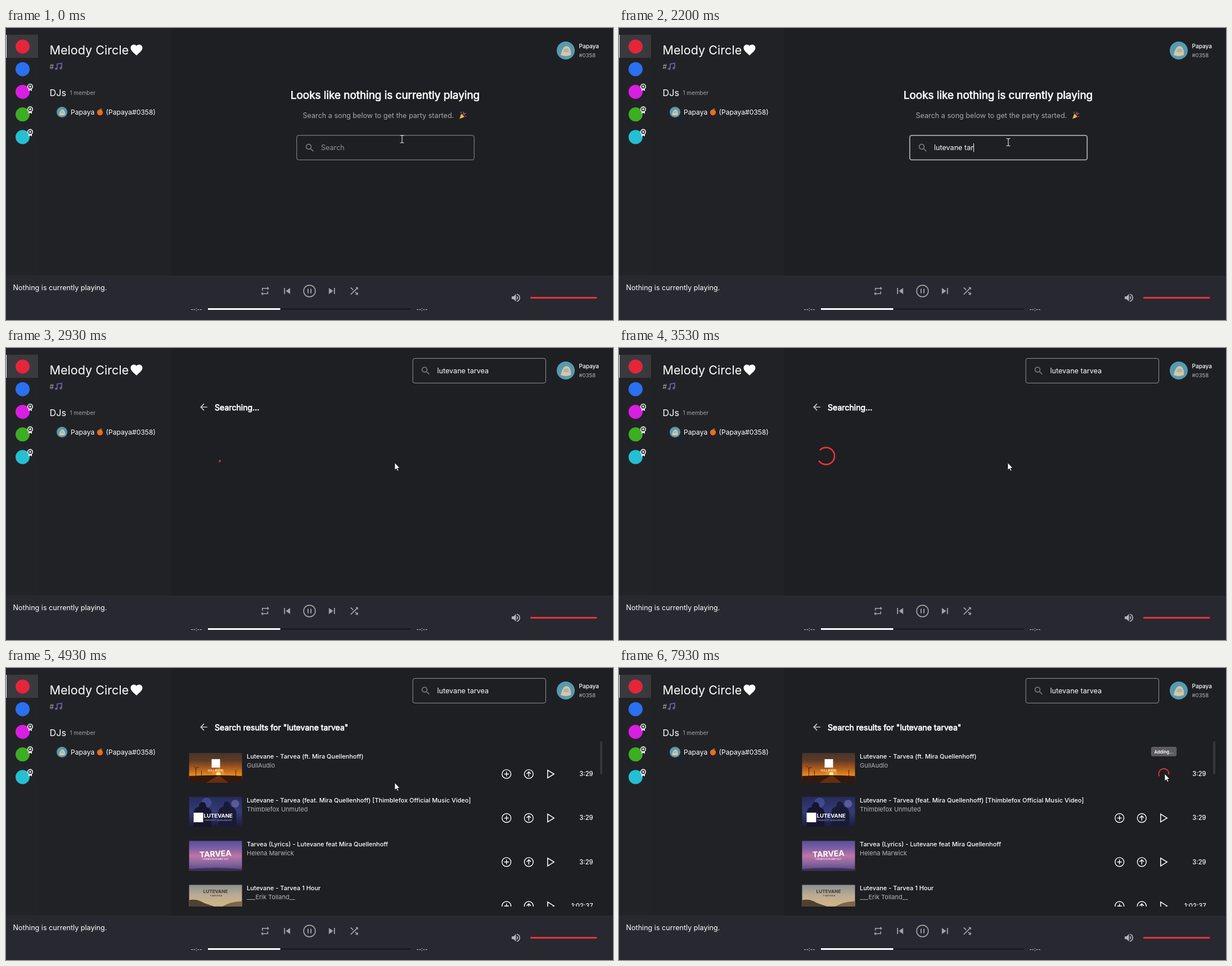
An HTML page for the animation above (8000 ms loop, 1079 px wide and 519 px high).

```html
<!DOCTYPE html>
<html lang="en">
<head>
<meta charset="utf-8">
<title>Music room</title>
<style>
  html, body { margin: 0; width: 100%; height: 100%; overflow: hidden; background: #1e1f23; }
  svg { display: block; width: 1079px; height: 519px; }
  text { font-family: Inter, "Open Sans", sans-serif; white-space: pre; }
</style>
</head>
<body>
<svg id="stage" viewBox="0 0 1079 519" xmlns="http://www.w3.org/2000/svg"></svg>
<script>
const LOOP = 8000;
const QUERY = 'lutevane tarvea';
const RED = '#e93239';
const GREY = '#a3a3a7';

const ICON = {
  search: 'M15.5 14h-.79l-.28-.27C15.41 12.59 16 11.11 16 9.5 16 5.91 13.09 3 9.5 3S3 5.91 3 9.5 5.91 16 9.5 16c1.61 0 3.09-.59 4.23-1.57l.27.28v.79l5 4.99L20.49 19l-4.99-5zm-6 0C7.01 14 5 11.99 5 9.5S7.01 5 9.5 5 14 7.01 14 9.5 11.99 14 9.5 14z',
  repeat: 'M7 7h10v3l4-4-4-4v3H5v6h2V7zm10 10H7v-3l-4 4 4 4v-3h12v-6h-2v4z',
  prev: 'M6 6h2v12H6zm3.5 6l8.5 6V6z',
  next: 'M6 18l8.5-6L6 6v12zM16 6v12h2V6h-2z',
  shuffle: 'M10.59 9.17L5.41 4 4 5.41l5.17 5.17 1.42-1.41zM14.5 4l2.04 2.04L4 18.59 5.41 20 17.96 7.46 20 9.5V4h-5.5zm.33 9.41l-1.41 1.41 3.13 3.13L14.5 20H20v-5.5l-2.04 2.04-3.13-3.13z',
  volume: 'M3 9v6h4l5 5V4L7 9H3zm13.5 3c0-1.77-1.02-3.29-2.5-4.03v8.05c1.48-.73 2.5-2.25 2.5-4.02zM14 3.23v2.06c2.89.86 5 3.54 5 6.71s-2.11 5.85-5 6.71v2.06c4.01-.91 7-4.49 7-8.77s-2.99-7.86-7-8.77z',
  back: 'M20 11H7.83l5.59-5.59L12 4l-8 8 8 8 1.41-1.41L7.83 13H20v-2z',
  heart: 'M12 21.35l-1.45-1.32C5.4 15.36 2 12.28 2 8.5 2 5.42 4.42 3 7.5 3c1.74 0 3.41.81 4.5 2.09C13.09 3.81 14.76 3 16.5 3 19.58 3 22 5.42 22 8.5c0 3.78-3.4 6.86-8.55 11.54L12 21.35z'
};

// Markup helpers
const rect = (x, y, w, h, fill, more = '') =>
  `<rect x="${x}" y="${y}" width="${w}" height="${h}" fill="${fill}" ${more}/>`;
const circle = (x, y, r, fill, more = '') =>
  `<circle cx="${x}" cy="${y}" r="${r}" fill="${fill}" ${more}/>`;
const path = (d, fill, more = '') => `<path d="${d}" fill="${fill}" ${more}/>`;
const line = (d, color, w = 1, more = '') =>
  path(d, 'none', `stroke="${color}" stroke-width="${w}" ${more}`);
const text = (x, y, size, str, fill = '#fff', more = '') =>
  `<text x="${x}" y="${y}" font-size="${size}" fill="${fill}" ${more}>${str}</text>`;
const bold = (x, y, size, str, more = '') =>
  text(x, y, size, str, '#fff', `stroke="#fff" stroke-width=".7" ${more}`);
const icon = (name, x, y, scale, fill = GREY) =>
  path(ICON[name], fill, `transform="translate(${x} ${y}) scale(${scale}) translate(-12 -12)"`);
const group = (id, body, more = '') => `<g id="${id}" ${more}>${body}</g>`;
const gradient = (id, ...colors) =>
  `<linearGradient id="${id}" x2="0" y2="1">${colors.map((c, i) =>
    `<stop offset="${i / (colors.length - 1)}" stop-color="${c}"/>`).join('')}</linearGradient>`;

const avatar = (x, y, r) => `<g transform="translate(${x} ${y}) scale(${r / 16})">` +
  circle(0, 0, 16, '#579bb0') +
  path('M-9 8Q-8 1-4 -5Q1 -10 6 -6Q10 0 9 8Q0 12-9 8z', '#d8c6a4') +
  path('M-4 3Q-4-4 1-4Q6-4 6 3z', '#a9b5ae') + '</g>';

const badge = (x, y) =>
  path(`M${x - 3} ${y + 2}v6l3-1.6 3 1.6v-6z`, '#f2f2f2') +
  circle(x, y, 4.3, '#27282c', 'stroke="#f2f2f2" stroke-width="1.6"') +
  circle(x, y, 1.8, '#f2f2f2');

function servers() {
  const colors = ['#e6253b', '#2b70ee', '#d81fdf', '#3cae22', '#25bfd4'];
  return rect(0, 0, 57, 440, '#222327') + rect(57, 0, 237, 440, '#212226') +
    rect(0, 12, 57, 41, '#3a3a3e') + rect(0, 12, 1, 41, '#fff') +
    colors.map((c, i) => circle(29.5, 33 + 40.2 * i, 12.5, c) +
      (i > 1 ? badge(43, 23.5 + 40.3 * i) : '')).join('');
}

function sidebar() {
  const note = line('M91 72V64l8-1.500V71', '#6d5aa5', 1.8) +
    circle(89.4, 72.4, 2.2, '#6d5aa5') + circle(97.4, 71.2, 2.2, '#6d5aa5');
  const fruit = circle(167, 150, 5.2, '#f4691c') + path('M166 145.500q2-3.500 5-2q-1 2.500-5 2z', '#4d9a35');
  return text(77.5, 47, 21.6, 'Melody Circle') + icon('heart', 232, 39, 1.05, '#fff') +
    text(77.5, 73, 12, '#', '#a9a9ad') + note +
    text(77.5, 121, 16.2, 'DJs') + text(113.5, 118.7, 9.9, '1 member', GREY) +
    avatar(99.5, 149.5, 9.5) + text(115, 153.5, 12.1, 'Papaya') + fruit +
    text(177.5, 153.5, 12.1, '(Papaya#0358)');
}

function account() {
  return avatar(995, 40, 16) + text(1018.5, 35.6, 10.1, 'Papaya', '#fff', 'font-weight="500"') +
    text(1018.5, 52, 9.6, '#0358', '#b5b5b8');
}

function footer() {
  return rect(0, 440, 1079, 79, '#282830') + text(12.5, 465.5, 12.6, 'Nothing is currently playing.') +
    icon('repeat', 460.5, 467.5, 0.8) + icon('prev', 499.7, 467.5, 0.9) +
    circle(539.5, 467.5, 10.4, 'none', `stroke="${GREY}" stroke-width="1.6"`) +
    rect(536, 463.5, 1.8, 8, GREY) + rect(541.2, 463.5, 1.8, 8, GREY) +
    icon('next', 579.3, 467.5, 0.9) + icon('shuffle', 619, 467.5, 0.85) +
    text(328.5, 503, 9.4, '--:--') + text(729.5, 503, 9.4, '--:--') +
    rect(359, 498, 361, 3, '#1c1c20') + rect(359, 498, 128.5, 3, '#fff') +
    icon('volume', 906.5, 479.5, 0.83, '#b5b5b8') + rect(932, 478, 118.5, 3, RED, 'rx="1"');
}

function home() {
  const popper = path('M806 161.500l3.500-9.500 5.500 6z', '#f0b93a') +
    line('M812 153q3-1 1-4M814 155q1-4 4-3', '#c65a9a', 1.2) +
    circle(809, 150, 0.9, '#5f9fe0') + circle(817, 157, 0.9, '#e4573f');
  return bold(674, 126, 18.9, 'Looks like nothing is currently playing', 'text-anchor="middle"') +
    text(527.5, 160.3, 12.6, 'Search a song below to get the party started.', '#a9a9ac') + popper +
    rect(516.8, 190.8, 315.4, 43.6, 'none', 'id="field" rx="3.500" stroke="#929294"') +
    icon('search', 540, 213, 0.8, '#77787b') +
    text(560, 217.3, 12.6, '', '#fff', 'id="typed"') + rect(560, 205, 1, 15.5, '#fff', 'id="caret"');
}

function suggestions() {
  const words = ['lute practices', 'lute verse', 'lute', 'lutenist handbook',
    'lute definition', 'lute grip lesson', 'luthier'];
  return rect(517, 237.5, 315.5, 208, '#303033', 'rx="3"') +
    rect(828, 238, 4.5, 105, '#0b0b0d') +
    words.map((w, i) => text(529, 263 + 28.45 * i, 12.6, w)).join('');
}

function pageTop() {
  return rect(723.2, 18.5, 236.300, 43.8, 'none', 'rx="3.500" stroke="#939395"') +
    icon('search', 746, 40.5, 0.8, '#77787b') + text(766.5, 45, 12.6, QUERY) +
    icon('back', 351.5, 105, 0.8, '#c4c4c6') + bold(371, 110.5, 14.1, '', 'id="heading"');
}

// Thumbnails are 94 by 53, drawn from their own corner
const label = (x, y, size, str, fill, more = '') =>
  text(x, y, size, str, fill, `text-anchor="middle" font-weight="700" ${more}`);
const thumbs = [
  rect(0, 0, 94, 53, 'url(#dusk)') + circle(52, 38, 11, '#ffa528', 'opacity=".45"') +
    circle(52, 38, 4, '#ffe9a0') + path('M0 41Q48 38 94 41V53H0z', '#32180e') +
    path('M30 53L50 41h5L70 53z', '#7a3a12', 'opacity=".7"') +
    line('M12 41V27l-4-4M12 27l5-2M12 27v6M22 41V31M83 41V30', '#2c1a12', 0.8) +
    rect(40, 11, 15, 15, '#fff') + label(47, 33, 4.6, 'GULL AUDIO', '#f5e6d8'),
  rect(0, 0, 94, 53, 'url(#club)') + circle(31, 10, 9, '#4d60b0', 'opacity=".55"') +
    circle(82, 12, 7, '#8a82c8', 'opacity=".5"') +
    path('M8 53V27q2-9 9-9q1-9 7-9t7 9q9 2 9 12v23z', '#15162e') +
    path('M52 53V25q2-7 9-8q0-9 6-9t7 9q9 2 10 12v24z', '#191a36') +
    rect(8, 28, 17, 17, '#fff') + text(26, 36.5, 9.6, 'LUTEVANE', '#fff', 'font-weight="700"') +
    text(27, 42.5, 3.8, 'TARVEA FT. QUELLENHOFF', '#b9b9d4'),
  rect(0, 0, 94, 53, 'url(#shore)') + path('M0 53V50Q47 46 94 50V53z', '#3c3159') +
    label(47, 28, 14, 'TARVEA', '#fff', 'transform="rotate(-3 47 25)"') +
    label(47, 34, 3.6, 'LOREM DOLOR AMET ELIT', '#f0dff0'),
  rect(0, 0, 94, 53, 'url(#sand)') + path('M0 27Q14 24 26 32L46 39H0z', '#51412f') +
    path('M94 29Q72 30 58 39H94z', '#7d6547') +
    label(47, 15, 8.2, 'LUTEVANE', '#413a38') + label(48, 21, 4, 'T A R V E A', '#413a38')
];

function row(i, title, artist, time) {
  const y = 78.15 * i;
  const ring = x => circle(x, 188.5, 7.9, 'none', 'stroke="#fff" stroke-width="1.4"');
  const buttons = ring(889.7) + line('M885.500 188.500h8.400M889.700 184.300v8.400', '#fff', 1.4) +
    ring(929.3) + line('M929.300 193v-8M925.500 188.300l3.800-3.800 3.800 3.800', '#fff', 1.4) +
    line('M962.800 181.500v14l11.400-7z', '#fff', 1.5);
  return `<g transform="translate(0 ${y})"><g transform="translate(325.500 151)">${thumbs[i]}</g>` +
    text(428, 160.5, 11, title, '#fff', 'font-weight="500"') +
    text(428, 176.5, 11, artist, '#b6b6b9') + group('buttons' + i, buttons) +
    text(1043.5, 192.3, 11.1, time, '#fff', 'text-anchor="end" font-weight="500"') + '</g>';
}

function results() {
  return '<g clip-path="url(#rows)">' +
    row(0, 'Lutevane - Tarvea (ft. Mira Quellenhoff)', 'GullAudio', '3:29') +
    row(1, 'Lutevane - Tarvea (feat. Mira Quellenhoff) [Thimblefox Official Music Video]', 'Thimblefox Unmuted', '3:29') +
    row(2, 'Tarvea (Lyrics) - Lutevane feat Mira Quellenhoff', 'Helena Marwick', '3:29') +
    row(3, 'Lutevane - Tarvea 1 Hour', '___Erik Tolland__', '1:02:37') + '</g>' +
    rect(1056, 130.5, 4, 58, '#36373b') + circle(968.5, 188.5, 15, '#fff', 'id="ripple"') +
    group('tip', rect(945.8, 144, 45.4, 17, '#5c5c60', 'rx="3"') +
      text(968.5, 155.6, 7.7, '', '#fff', 'id="tipText" text-anchor="middle" font-weight="600"'));
}

const cursors = {
  beam: line('M-3.500-6.500h2.500l1 1 1-1h2.500M-3.500 6.500h2.500l1-1 1 1h2.500M0-5.500v11', '#e8e8e8', 1.1),
  arrow: path('M0 0V13l3-2.800 2 4.600 2-.900-2-4.400h4z', '#fff', 'stroke="#000" stroke-width=".7"'),
  hand: path('M-1 1.200a1.400 1.400 0 0 1 2.800 0V6c.5-1 2.400-.9 2.600.2.6-.8 2.200-.6 2.400.5.8-.5 1.900-.1 1.900 1V12q0 2-1 3.400V17H0v-1.600Q-2 13-4 9.600c-.6-1.200 1-2 1.800-1l1.200 1.300z',
    '#fff', 'stroke="#000" stroke-width=".9"')
};

document.getElementById('stage').innerHTML =
  '<defs><clipPath id="rows"><rect x="300" y="130" width="779" height="294"/></clipPath>' +
  '<clipPath id="drop"><rect id="dropEdge" x="510" y="230" width="330" height="216"/></clipPath>' +
  gradient('dusk', '#45342d', '#5f3a26', '#a8591f', '#e88a20', '#32180e') +
  gradient('club', '#262c5c', '#343b78', '#1d1b38') +
  gradient('shore', '#56509a', '#7d5fa3', '#bd76a4', '#8a65a2', '#54477f') +
  gradient('sand', '#8d8f90', '#b9ab94', '#d2b487', '#6f5a40') + '</defs>' +
  rect(0, 0, 1079, 519, '#1e1f23') + servers() + sidebar() + account() + footer() +
  group('home', home()) + group('drop-list', suggestions(), 'clip-path="url(#drop)"') +
  group('page', pageTop()) + group('results', results()) +
  line('', RED, 2.7, 'id="spinner"') +
  group('cursor', Object.entries(cursors).map(([k, v]) => group(k, v)).join(''));

const el = id => document.getElementById(id);
const show = (id, on) => el(id).setAttribute('display', on ? 'inline' : 'none');
const set = (id, key, value) => el(id).setAttribute(key, value);
const pick = (steps, t) => steps.filter(s => s[0] <= t).pop();

// [time, letters typed]
const typing = [[0, 0], [930, 1], [1070, 2], [1130, 3], [1200, 4], [1470, 7], [1670, 8], [1730, 9],
  [1870, 10], [2000, 11], [2200, 12], [2270, 13], [2330, 14], [2400, 15]];
// [time, x, y, shape]
const pointer = [[0, 704, 197.5, 'beam'], [130, 692, 203, 'beam'], [2870, 691, 204, 'arrow'],
  [5270, 708, 199, 'arrow'], [5330, 738, 186, 'arrow'], [5400, 763, 168, 'arrow'],
  [5730, 928, 157, 'arrow'], [6000, 954, 148, 'arrow'], [6130, 976, 166, 'arrow'],
  [6200, 974, 182, 'hand'], [6330, 970, 187.5, 'hand'], [7670, 970, 188, 'arrow']];

const easeInOut = x => {
  let lo = 0, hi = 1;
  for (let i = 0; i < 20; i++) {
    const s = (lo + hi) / 2;
    if (3 * s * s * (1 - s) * 0.58 + 3 * s * (1 - s) ** 2 * 0.42 + s ** 3 < x) lo = s; else hi = s;
  }
  return lo * lo * (3 - 2 * lo);
};

// Rotating arc that grows in the first half turn and shrinks in the second
function arc(cx, cy, r, ms) {
  const p = (ms / 1400) % 1;
  const e = easeInOut((p * 2) % 1);
  const from = p < 0.5 ? 15 * e : 15 + 110 * e;
  const to = Math.min(126.9, from + (p < 0.5 ? 1 + 99 * e : 100));
  const at = u => {
    const a = (u / 126.9 + p) * 2 * Math.PI;
    return `${cx + r * Math.cos(a)} ${cy + r * Math.sin(a)}`;
  };
  return `M${at(from)}A${r} ${r} 0 ${to - from > 63.45 ? 1 : 0} 1 ${at(to)}`;
}

function draw(t) {
  const tick = Math.floor((t + 5) * 0.015) / 0.015;
  const searching = t >= 2930;
  const found = t >= 4930;
  const adding = t >= 7670;

  show('home', !searching);
  show('drop-list', t >= 2530 && !searching);
  set('dropEdge', 'height', t < 2870 ? 210 : 216);
  show('page', searching);
  show('results', found);

  if (!searching) {
    const count = pick(typing, t)[1];
    const focused = t >= 470;
    set('field', 'stroke-width', focused ? 1.8 : 1);
    set('field', 'stroke', focused ? '#a9a9ab' : '#929294');
    el('typed').textContent = count ? QUERY.slice(0, count) : 'Search';
    set('typed', 'fill', count ? '#fff' : '#929295');
    show('caret', focused);
    set('caret', 'x', 560 + (count ? el('typed').getComputedTextLength() : 0));
  }

  el('heading').textContent = found ? `Search results for "${QUERY}"` : 'Searching...';
  show('buttons0', !adding);
  show('ripple', t >= 7330 && !adding);
  set('ripple', 'opacity', t < 7400 ? 0.08 : 0.14);
  show('tip', t >= 6530);
  set('tip', 'opacity', t < 6730 ? 0.6 : 1);
  set('tip', 'transform', `translate(0 ${adding ? -4 : 0})`);
  el('tipText').textContent = adding ? 'Adding...' : 'Play now';

  show('spinner', (searching && !found) || adding);
  set('spinner', 'stroke-width', adding ? 1.8 : 2.7);
  set('spinner', 'd', adding ? arc(968.5, 188, 9, tick - 7470)
    : arc(368, 192, 15.1, Math.max(0, Math.min(tick, 4533) - 2830)));

  const [, x, y, shape] = pick(pointer, t);
  set('cursor', 'transform', `translate(${x} ${y})`);
  for (const k in cursors) show(k, k === shape);
}

const start = performance.now();
function loop() {
  draw((performance.now() - start) % LOOP);
  requestAnimationFrame(loop);
}
loop();
</script>
</body>
</html>
```
